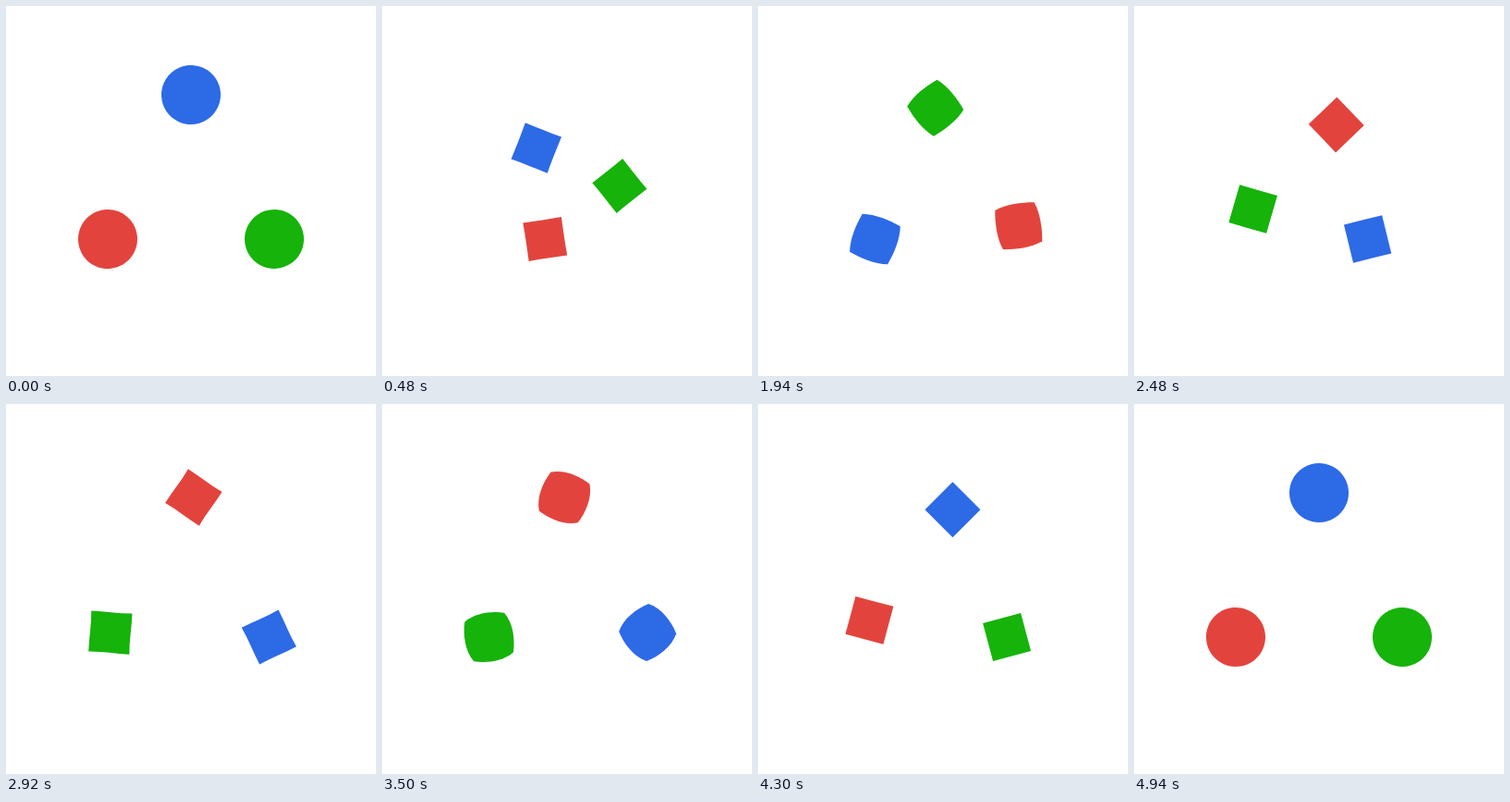
These frames come from a looping animation (400x400 px, 4.96 s). An HTML page with a canvas:

```html
<!DOCTYPE html>
<html lang="en">
<head>
<meta charset="utf-8">
<title>Three turning shapes</title>
<style>
  html, body { margin: 0; width: 100%; height: 100%; overflow: hidden; background: #fff; }
  canvas { display: block; }
</style>
</head>
<body>
<canvas id="stage" width="400" height="400"></canvas>
<script>
const ctx = document.getElementById("stage").getContext("2d");
const STEP = 20, FRAMES = 248, LEG = 83;
const RAD = Math.PI / 180;

const corners = [[200, 96], [110, 252], [290, 252]];
const headings = [120, 0, -120];
const colors = ["#2d6ae6", "#e2443d", "#16b30a"];

// Keys are [step within a leg, value].
const spin = [[0, -232], [9, -13], [24, 351.3], [41, 706.2], [49, 885], [54, 993], [60, 1093], [81, 1450]];
const radius = [[0, 32], [9, 31], [24, 29.7], [30, 30], [49, 30], [60, 31.2], [81, 32]];
const bulgeStart = [[0, 12.5], [9, 7], [22, -0.3], [30, 0], [49, 0], [60, -1.5], [81, 12.5]];
const bulgeEnd = [[0, 12.5], [9, 5], [22, -0.6], [30, 0], [49, 0], [60, -3.5], [81, 12.5]];

function track(keys, n) {
  for (let i = 1; i < keys.length; i++) {
    const [a, va] = keys[i - 1], [b, vb] = keys[i];
    if (n <= b) return va + (vb - va) * (n - a) / (b - a);
  }
  return keys[keys.length - 1][1];
}

function bezier(x1, y1, x2, y2, x) {
  const at = (a, b, t) => 3 * (1 - t) * (1 - t) * t * a + 3 * (1 - t) * t * t * b + t * t * t;
  let lo = 0, hi = 1;
  for (let i = 0; i < 30; i++) {
    const mid = (lo + hi) / 2;
    if (at(x1, x2, mid) < x) lo = mid; else hi = mid;
  }
  return at(y1, y2, (lo + hi) / 2);
}

// A closed shape with four sides, each a curve pushed outwards by its bulge.
function drawShape(x, y, angle, n, color) {
  const r = track(radius, n), h1 = track(bulgeStart, n), h2 = track(bulgeEnd, n);
  const half = r * Math.SQRT1_2;
  const inset = half * 2 * (1 / 3 - 0.057 * Math.max(0, (h1 + h2) / 25));
  ctx.save();
  ctx.translate(x, y);
  ctx.rotate(angle * RAD);
  ctx.fillStyle = color;
  ctx.beginPath();
  ctx.moveTo(-half, -half);
  for (let side = 0; side < 4; side++) {
    ctx.bezierCurveTo(-half + inset, -half - h1, half - inset, -half - h2, half, -half);
    ctx.rotate(Math.PI / 2);
  }
  ctx.fill();
  ctx.restore();
}

function draw(now) {
  const frame = Math.floor(now / STEP) % FRAMES;
  const leg = Math.floor(frame / LEG), n = frame % LEG;
  const p = bezier(0.405, 0, 0.167, 1, n / (LEG - 1));
  ctx.fillStyle = "#fff";
  ctx.fillRect(0, 0, 400, 400);
  colors.forEach((color, i) => {
    const from = (i + leg) % 3;
    const [ax, ay] = corners[from], [bx, by] = corners[(from + 1) % 3];
    drawShape(ax + (bx - ax) * p, ay + (by - ay) * p, headings[from] + track(spin, n), n, color);
  });
}

const start = performance.now();
function tick() {
  draw(performance.now() - start);
  requestAnimationFrame(tick);
}
tick();
</script>
</body>
</html>
```
